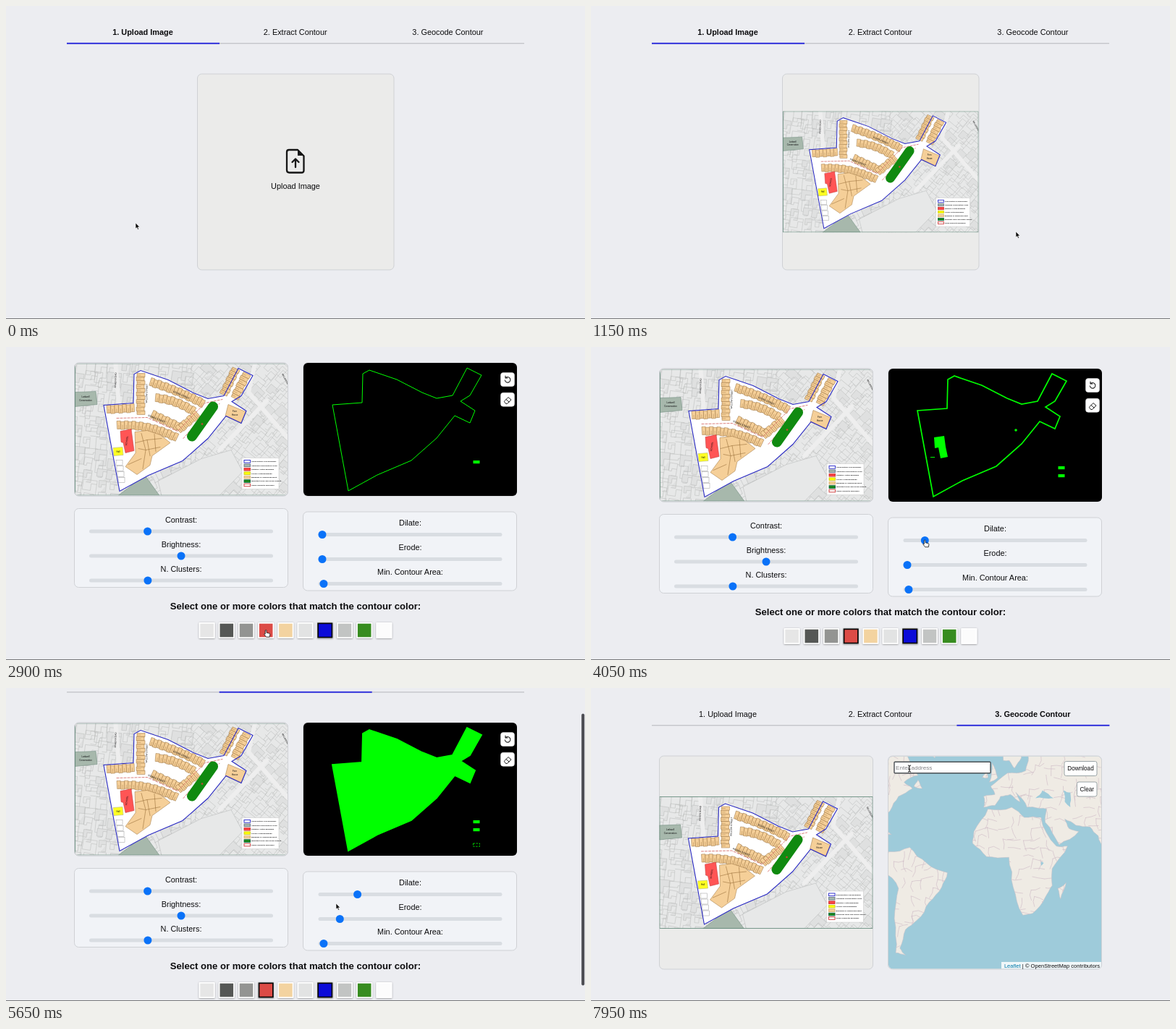
Recreate the animation shown at these times as an HTML page. Size 800 by 433 pixels, loop 8000 ms.

```html
<!DOCTYPE html>
<html lang="en">
<head>
<meta charset="utf-8">
<title>Contour extraction demo</title>
<style>
  html, body { margin: 0; height: 100%; overflow: hidden; background: #ecedf1; }
  #stage { display: block; width: 100vw; height: 100vh; }
  text { font-family: "Liberation Sans", Arial, sans-serif; fill: #0c0c0e; white-space: pre; }
  .ui text { font-family: Inter, sans-serif; fill: #333; }
  .ui .dim, .dim { fill: #808084 !important; }
  .line { fill: none; stroke-linecap: round; stroke-linejoin: round; }
  .hide { display: none; }
</style>
</head>
<body>
<svg id="stage" viewBox="0 0 800 433"></svg>
<script>
const LOOP = 8000, BLUE = '#0a72f8', LIME = '#0f0';
const MID = 'text-anchor="middle"', BOLD = 'font-weight="bold"';

// ---------- drawing helpers ----------
const text = (x, y, str, size = 10.9, attrs = MID) =>
  `<text x="${x}" y="${y + size * .36}" font-size="${size}" ${attrs}>${str}</text>`;
const rect = (x, y, w, h, fill, attrs = '') =>
  `<rect x="${x}" y="${y}" width="${w}" height="${h}" fill="${fill}" ${attrs}/>`;
const circle = (x, y, r, fill, attrs = '') => `<circle cx="${x}" cy="${y}" r="${r}" fill="${fill}" ${attrs}/>`;
const poly = (points, fill, attrs = '') => `<polygon points="${points}" fill="${fill}" ${attrs}/>`;
const path = (d, stroke, width = 1, attrs = '') =>
  `<path class="line" d="${d}" stroke="${stroke}" stroke-width="${width}" ${attrs}/>`;
const group = (id, body, attrs = '') => `<g id="${id}" ${attrs}>${body}</g>`;
const clip = (id, body) => `<clipPath id="${id}">${body}</clipPath>`;
const outline = (color, width = .5) => `stroke="${color}" stroke-width="${width}"`;
const times = (n, fn) => Array.from({ length: n }, (_, i) => fn(i)).join('');

function seeded(seed) {
  return () => (seed = (seed * 16807) % 2147483647) / 2147483647;
}

// ---------- town plan, 295 x 183 ----------
const BOUNDARY = '81,55 82,15 91,10 129,23 164,41 184,49 206,45 226,7 246,17 230,45 217,53 237,66 ' +
  '230,83 209,73 184,104 149,135 102,155 62,177 40,58';
const TAN = '#f5cf98', BROWN = '#9a713c', SAGE = '#a7b8ac';

// A row of houses along a gently bent street.
function terrace(x, y, x2, y2, bend = 0, depth = 11) {
  const dx = x2 - x, dy = y2 - y, length = Math.hypot(dx, dy), n = Math.round(length / 5.2), w = length / n;
  return times(n, i => {
    const u = i / n, lift = bend * 4 * u * (1 - u);
    const angle = Math.atan2(dy, dx) + Math.atan(bend * 4 * (1 - 2 * u) / length);
    const px = x + dx * u - dy / length * lift, py = y + dy * u + dx / length * lift;
    return `<g transform="translate(${px} ${py}) rotate(${angle * 180 / Math.PI})">` +
      rect(0, i % 2, w, depth, TAN, outline(BROWN)) + path(`M${w / 2} ${depth * .55}V${depth}`, BROWN, .4) + '</g>';
  });
}

function surroundings() {
  const rnd = seeded(77);
  let out = '';
  for (let y = -6; y < 190; y += 15) for (let x = -6; x < 300; x += 17) {
    const tilt = x > 150 ? 38 : x > 70 && y > 130 ? -28 : 4;
    const w = 9 + rnd() * 11, h = 8 + rnd() * 10, a = w * (.3 + rnd() * .4), b = h * (.3 + rnd() * .4);
    out += `<path transform="translate(${x + rnd() * 6} ${y + rnd() * 6}) rotate(${tilt + rnd() * 6})" ` +
      `d="M0 0H${w}V${b}H${a}V${h}H0ZM${w} ${b}V${h + 6}H${a}" fill="${rnd() < .3 ? '#dfe0e0' : 'none'}" ${outline('#b3b5b4', .45)}/>`;
  }
  return out;
}

function legend() {
  const rows = [['#fff', '#2323c8', 'Conservation Area Boundary'], [SAGE, '#667788', 'Adjoining Conservation Areas'],
    ['#f44', '#c33', 'Statutory Listed Buildings'], ['#ff0', '#cc2', 'Locally Listed Buildings'],
    [TAN, '#d9b070', 'Buildings of Townscape Merit'], ['#1c8a1a', '#164', 'Important Trees and Green Spaces'],
    ['#fff', '#c33', 'Urban Character Boundary']];
  return rect(231, 131, 51, 43, '#fff', outline('#bbb', .4)) + rows.map(([fill, stroke, label], i) => {
    const y = 134 + i * 5.45;
    return rect(234, y, 8.5, 3.6, fill, outline(stroke, .9)) + text(244, y + 1.8, label, 2.5, BOLD);
  }).join('');
}

const label = (x, y, str, turn) =>
  `<text font-size="3.2" transform="translate(${x} ${y}) rotate(${turn})">${str}</text>`;

const plan = rect(0, 0, 295, 183, '#e7e8e8') + surroundings() +
  path('M56 -4L61 58M250 -4L240 40 300 110M265 52L200 120', '#eee', 6) +
  poly('115,163 175,132 216,120 232,150 200,183 120,183', '#e7e8e8', outline('#b3b5b4')) +
  poly('0,40 29,39 31,57 0,60', SAGE, outline('#668576')) +
  poly('60,183 97,155 117,183', SAGE, outline('#668576')) +
  text(15, 46, 'Larkwell', 3) + text(15, 51, 'Conservation', 3) +
  poly(BOUNDARY, '#fff') +
  terrace(97, 14, 97, 71) + terrace(106, 20, 181, 51, -2) + terrace(44, 58, 82, 56) +
  terrace(112, 42, 168, 62, -4) + terrace(109, 65, 150, 84) + terrace(139, 88, 166, 65) +
  terrace(58, 80, 144, 98, -6) + terrace(228, 10, 211, 46) + terrace(243, 17, 226, 51) +
  poly('83,95 100,93 118,99 132,110 107,128 104,141 86,154 70,143 84,124', TAN, outline(BROWN)) +
  path('M84 110L100 106 104 128M92 97L98 120 118 116M74 140L92 132M100 106L120 104M88 118L98 120 94 146M110 98L112 122', BROWN, .6) +
  poly('212,57 236,67 230,82 208,73', TAN, outline(BROWN)) + text(221, 66, 'Fern', 3) + text(221, 71, 'House', 3) +
  poly('63,94 78,91 82,121 70,124 67,110 64,109', '#f55', outline('#b33')) +
  poly('53,117 66,116 67,127 54,128', '#ff2', outline('#aa8')) + text(60, 122, 'Hall', 3) +
  times(4, i => rect(57 + i, 134 + i * 8, 9, 7, '#fff', outline('#999'))) +
  path('M58 76L100 75 142 94 180 55 204 50M150 104L186 62 200 56', '#d2605e', .8, 'stroke-dasharray="3 2"') +
  path('M162 101L191 60', '#108a10', 14) + circle(176, 84, 1.3, '#c43') +
  label(100, 55, 'WILLOW STREET', -88) + label(136, 40, 'ELDER STREET', 24) + label(101, 73, 'ROWAN STREET', 22) +
  label(57, 34, 'ASHEN ROAD', -88) + label(286, 15, 'MILLBROW ROAD', 62) + label(72, 114, 'SCHOOL', -82) +
  poly(BOUNDARY, 'none', outline('#2a2ac4', 1.1)) + legend() +
  rect(.4, .4, 294.2, 182.2, 'none', outline('#5d8676', .8));

// ---------- world map (Mercator) ----------
const DEG = Math.PI / 180, SCALE = 1.93;
const project = ([lon, lat]) =>
  [560 + SCALE * lon, 242 - SCALE / DEG * Math.log(Math.tan(Math.PI / 4 + lat * DEG / 2))];

// Key points of a coast, roughened by midpoint displacement.
function coast(str) {
  const rnd = seeded(str.length * 31);
  let pts = str.split(' ').map(p => project(p.split(',').map(Number)));
  for (let pass = 0; pass < 2; pass++) {
    pts = pts.flatMap((a, i) => {
      const b = pts[(i + 1) % pts.length], k = (rnd() - .5) * .16;
      return [a, [(a[0] + b[0]) / 2 + (b[1] - a[1]) * k, (a[1] + b[1]) / 2 - (b[0] - a[0]) * k]];
    });
  }
  return pts.map(p => p.map(v => v.toFixed(1))).join(' ');
}
const AFRICA = '-6,36 11,37 20,31 32,31 43,12 51,12 40,-4 40,-16 35,-24 26,-34 19,-35 12,-17 9,4 -7,4.5 -17,14 -16,22';
const AMERICA = '-77,8 -62,11 -50,0 -35,-7 -39,-17 -48,-27 -57,-38 -65,-43 -69,-52 -65,-55 -72,-54 -73,-37 -70,-18 -81,-5';
const EURASIA = '-9,37 -9,43 -1,44 -4,48 8,54 21,55 23,60 20,66 84,66 84,18 80,9 77,9 73,19 67,25 57,26 49,30 52,24 59,22 ' +
  '45,13 35,28 36,36 27,37 22,37 14,45 17,40 10,44 3,43 -1,38';
const ISLANDS = ['44,-18 50,-14 46,-25', '-5,50 1,52 -3,58', '-10,52 -6,52 -7,55', '-59,48 -53,47 -56,51', '-84,22 -75,20 -78,22',
  '-50,63 -44,60 -40,64', '-84,31 -76,35 -70,43 -60,47 -66,50 -56,53 -64,61 -78,62 -78,53', '5,59 9,59 13,56 18,60 17,66 5,66'];
const LANDS = [AFRICA, AMERICA, EURASIA, ...ISLANDS].map(coast);
const LAKES = ['28,42 33,46 41,42 34,42', '48,46 53,45 53,37 49,40', '32,-2 34,0 32,1'].map(coast);

function borders() {
  const rnd = seeded(19), wob = () => (rnd() - .5) * 9;
  let d = '';
  for (let x = 415; x < 706; x += 15) for (let y = 96; y < 380; y += 14) {
    const from = `M${x + wob()} ${y + wob()}l`;
    if (rnd() < .6) d += `${from}${6 + wob() / 2} ${wob() / 2} ${8 + wob() / 2} ${wob()}`;
    if (rnd() < .6) d += `${from}${wob() / 2} 7 ${wob()} 7`;
  }
  return path(d, '#cdb9c4', .6);
}
const world = rect(411, 94, 295, 295, '#9ecbda') + LANDS.map(p => poly(p, '#efebe4', outline('#c3bcc4'))).join('') +
  `<g clip-path="url(#land)">${borders()}</g>` + LAKES.map(p => poly(p, '#9ecbda')).join('');

// ---------- page ----------
const FRAME = 'rx="6" stroke="#cfd1d5"';
const panel = (col, y, h, fill, w = 295) => rect(94.5 + 316 * col, y, w, h, fill, FRAME);
const stepper = rect(84, 51, 632, 1.4, '#c4c5ca') + rect(84, 50.8, 211, 1.8, '#2020dc', 'id="bar"') +
  ['1. Upload Image', '2. Extract Contour', '3. Geocode Contour']
    .map((s, i) => text(189 + i * 210.7, 36, s, 10.9, MID + ' class="step"')).join('');

const step1 = rect(264.5, 94, 271.5, 271, '#ebebea', `id="card" ${FRAME}`) +
  group('prompt', path('M391 199h12l8.5 8.5v20q0 3-3 3h-17q-3.5 0-3.5-3.5v-25q0-3 3-3zM400 223v-11M395.5 216l4.5-4.5 4.5 4.5', '#151515', 2.3) +
    poly('403,198 412,207 403,207', '#151515') + text(400, 249, 'Upload Image')) +
  group('preview', '<use href="#plan" transform="translate(265 145.5) scale(.917)"/>');

const SLIDERS = [['contrast', 'Contrast:', .309], ['bright', 'Brightness:', .5], ['clusters', 'N. Clusters:', 4 / 29],
  ['dilate', 'Dilate:', 0], ['erode', 'Erode:', 0], ['area', 'Min. Contour Area:', .008]];
function knob(id, value, scroll = 0) {
  const i = SLIDERS.findIndex(s => s[0] === id), col = Math.floor(i / 3);
  return [120.5 + 316.5 * col + 243 * value, 327 + 34 * (i % 3) + 4.5 * col - scroll];
}
const sliders = SLIDERS.map(([id, name, value]) => {
  const [x, y] = knob(id, 0);
  return text(x + 121.5, y - 16, name) + rect(x - 5.5, y - 2.5, 254, 5, '#d9dde2', 'rx="2.5"') +
    circle(knob(id, value)[0], y, 5.5, BLUE, `id="${id}"`);
}).join('');

const COLORS5 = ['#ebebeb', '#45564f', '#e2cfa6', '#979797', '#d3504b'];
const COLORS10 = ['#e6e6e6', '#555755', '#939492', '#dc4b46', '#f3d3a0', '#e2e3e3', '#0b0bd8', '#c2c4c3', '#378c1f', '#fcfcfc'];
const RED = 3, NAVY = 6;
const swatch = (i, n, scroll = 0) => [400 + (i - (n - 1) / 2) * 27.2, 464 - scroll];
const swatches = list => list.map((color, i) => {
  const [x, y] = swatch(i, list.length);
  return rect(x - 11, y - 11, 22, 22, '#fff', 'rx="1" filter="url(#soft)"') + rect(x - 9.3, y - 9.3, 18.6, 18.6, color) +
    rect(x - 9.7, y - 9.7, 19.4, 19.4, 'none', `class="ring hide" ${outline('#050505', 1.8)}`);
}).join('');

const bit = i => rect(234.5, 135 + i * 11 + (i > 1 ? 10 : 0), 9, 4.2, i > 1 ? 'none' : LIME,
  'class="bit"' + (i > 1 ? ` ${outline(LIME, .8)} stroke-dasharray="2.5 1.5"` : ''));
const contour = rect(411, 94, 295, 184, '#000') + '<g transform="translate(411 94)">' +
  poly(BOUNDARY, 'none', `id="shape" stroke="${LIME}"`) +
  group('reds', poly('63,95 77,93 79,108 82,122 72,124 69,109 64,110', LIME) + rect(58, 122, 6, 1, LIME) + circle(176, 85, 1.8, LIME)) +
  times(3, bit) + '</g>';
const tool = (id, y, icon) => rect(683.5, y - 9.5, 19, 19, '#fff', `id="${id}" rx="3.5" ${outline('#d8d8da', .6)}`) + icon;

const step2 = panel(0, 94, 184, '#ebebea') + '<g clip-path="url(#left)"><use href="#plan" x="95" y="94.5"/></g>' + panel(0, 94, 184, 'none') +
  panel(1, 94, 184, '#edeef1') + group('contour', contour, 'clip-path="url(#right)"') +
  tool('undo', 117, path('M690.5 114.5a3.8 3.8 0 1 1-1.2 3.3M690 112v3h3', '#222', 1.1)) +
  tool('erase', 144.7, path('M688.5 147l5.5-5.5 4 3.5-5.5 5.5h-1.5zM691 144.5l4 3.5', '#222', 1, 'id="rubber"')) +
  panel(0, 295.5, 109, '#f1f3f7') + panel(1, 300, 109, '#f1f3f7') + sliders +
  text(400, 430.5, 'Select one or more colors that match the contour color:', 13.1, `${MID} ${BOLD}`) +
  group('few', swatches(COLORS5)) + group('many', swatches(COLORS10));

const white = (x, y, w, label) => rect(x, y, w, 20, '#fff', `rx="2.5" ${outline('#8f9a9e', .9)}`) + text(x + w / 2, y + 10, label, 8.2);
const step3 = panel(0, 94, 295, '#ebebea') + '<use href="#plan" x="94.5" y="150"/>' +
  `<g clip-path="url(#globe)">${world}${rect(567, 379, 139, 10, '#fff', 'opacity=".85"')}</g>` + panel(1, 94, 295, 'none') +
  text(703, 384, '<tspan fill="#0078a8">Leaflet</tspan> | © OpenStreetMap contributors', 7.6, 'text-anchor="end"') +
  rect(419, 102.3, 133, 15.5, '#fff', `rx="1" ${outline('#4b5054', 1.4)}`) +
  text(421, 110.5, 'Enter address', 8.1, 'class="dim"') + white(654, 101.5, 45, 'Download') + white(671.5, 130, 27.5, 'Clear');

// ---------- file dialog ----------
const INDIGO = '#5a68cf', TEAL = '#58a3b0', GREY = '#777';
const ring = (color, inner) => circle(0, 0, 3.8, 'none', outline(color, .9)) + path(inner, color, .7);
const tag = color => circle(0, 0, 2.5, color, outline(color === 'none' ? GREY : color, .9));
const SIDEBAR = [
  ['Favourites', [
    ['Recents', ring(INDIGO, 'M0-2v2.300h1.800')], ['Applicati…', path('M-3.5 3.5L0-3.5 3.5 3.5M-4 1.5h8', INDIGO, .9)],
    ['Desktop', path('M-4-3.5h8v6h-8zM-4-1.500h8', INDIGO, .9)], ['Parcelo', rect(-3.5, -3.5, 7, 7, INDIGO)],
    ['Downloads', ring(INDIGO, 'M0-2v4M-1.600.5L0 2 1.600.5')]]],
  ['Nimvra', [['Nimvra Dri…', circle(0, 0, 3.6, TEAL)], ['Shared', path('M-4-3h3l1 1h4v5.500h-8zM-4-.5h8', TEAL, .9)]]],
  ['Locations', [['Network', ring(GREY, 'M-3.800 0h7.600M0-3.800v7.600M-2.500-2.500l5 5M2.500-2.500l-5 5')]]],
  ['Tags', [['.py', tag('none')], ['Importante', tag('none')], ['Gris', tag('#858588')], ['Roja', tag('#d94b4b')],
    ['Naranja', tag('#c2553f')], ['Amarilla', tag('#ab7544')]]]
];
function sidebar() {
  let y = 57, out = '';
  for (const [head, items] of SIDEBAR) {
    out += text(191, y, head, 5.8, 'class="dim" font-weight="600"');
    y += 12.2;
    for (const [name, icon] of items) {
      out += `<g transform="translate(196.5 ${y})">${icon}</g>` + text(204, y, name, 6.7, '');
      y += 15.2;
    }
    y += 5.3;
  }
  return out;
}
const box = (x, y, w, label = '') => rect(x, y, w, 11.5, '#f7f7f7', `rx="2.5" ${outline('#9b9b9b', .8)}`) + text(x + w / 2, y + 5.7, label, 6.6);
const grid = (n, x) => times(n * 2, i => rect(x + (i % n) * (7 / n), 70.5 + Math.floor(i / n) * 3.5, 5 / n, 2.5, '#444'));
const file = (x, name, size) => text(x, 146.8, name, 6.5) + text(x, 154.8, size, 5.1, MID + ' class="dim"');
const dialog = rect(182.5, 43.5, 435, 286, '#f2f2f2', `rx="7" fill-opacity=".92" ${outline('#77787a', 1)}`) +
  '<path d="M252 44H189q-6 0-6 6V323q0 6 6 6h63z" fill="#e4e4e6" opacity=".75"/>' +
  path('M252.3 44V329', '#a3a3a5', .8) + path('M253 91H617M253 296.5H617', '#bcbcbe', .8) + sidebar() +
  text(435, 53, 'Choose Files to Upload', 5.9, MID + ' font-weight="500"') +
  box(263, 67.5, 27) + path('M276.5 67.5v11.5', '#aaa', .7) + path('M270.5 71l-2 2.3 2 2.3M282.5 71l2 2.3-2 2.3', GREY) +
  box(293, 67.5, 26) + grid(2, 299) + box(322.5, 67.5, 25.5) + grid(3, 329) +
  path('M311 72.5l1.7 1.7 1.7-1.7M340 72.5l1.7 1.7 1.7-1.7', '#333') +
  box(378.5, 67.5, 113) + rect(384, 70, 7.5, 6.5, '#46a5e6', 'rx="1"') + text(394, 73.3, 'images', 6.7, '') +
  path('M484.5 72l1.6-1.7 1.6 1.7M484.5 74.5l1.6 1.7 1.6-1.7', '#333', .9) +
  box(523.5, 67.5, 82.5) + circle(530, 72.7, 2.3, 'none', outline('#555', 1)) + path('M531.7 74.5l2 2', '#555') +
  text(538, 73.3, 'Search', 6.7, 'class="dim"') +
  group('picked', rect(264.5, 101.5, 39.5, 39, '#929294', 'rx="3"') + rect(264, 142.5, 40.5, 8.5, '#cfcfd1', 'rx="2"')) +
  '<use href="#plan" transform="translate(269 111) scale(.106 .118)"/>' + rect(268.5, 110.5, 32, 22.5, 'none', outline('#fff', 1)) +
  rect(330, 112, 31, 19.5, '#ccd7d6', outline('#fff', .8)) + poly('338,116 347,114 355,126 344,129 337,124', '#e9b7b3') +
  file(284, 'test_image1', '1,502×936') + file(345, 'test_image2.png', '1,024×576') +
  box(523.5, 307.5, 40, 'Cancel') + box(567, 307.5, 40, 'Upload');

const CURSORS = {
  arrow: '<path d="M0 0v8l1.8-1.6 1.3 2.9 1.4-.6-1.3-2.8h2.5z" fill="#0a0a0a" stroke="#fff" stroke-width=".6"/>',
  hand: '<path d="M-1 0q1-1 1.8 0v3.2l4 1q1 .4 .8 1.6l-.6 3.4h-4.600l-3-3.800q.1-1.200 1.600-.2z" fill="#fff" stroke="#111" stroke-width=".8"/>',
  cross: path('M-4 0H4M0-4V4', '#fff', 2) + path('M-4 0H4M0-4V4', '#333', .9),
  beam: path('M-1.7-4.5q1.7 0 1.7 1v7q0 1-1.7 1M1.7-4.5q-1.7 0-1.7 1M1.7 4.5q-1.7 0-1.7-1M-1 .8h2', '#111')
};

document.getElementById('stage').innerHTML = '<defs>' + clip('frame', rect(0, 0, 295, 183, '#000')) +
  clip('left', rect(95, 94.5, 294, 183, '#000', 'rx="6"')) + clip('right', rect(411, 94, 295, 184, '#000', 'rx="6"')) +
  clip('globe', rect(411, 94.5, 294.5, 294, '#000', 'rx="6"')) + clip('land', LANDS.map(p => poly(p, '#000')).join('')) +
  '<filter id="soft" x="-30%" y="-30%" width="160%" height="160%"><feDropShadow dx="0" dy=".6" stdDeviation="1" flood-opacity=".4"/></filter>' +
  '<filter id="deep" x="-10%" y="-10%" width="120%" height="125%"><feDropShadow dx="0" dy="4" stdDeviation="6" flood-opacity=".25"/></filter>' +
  group('plan', plan, 'clip-path="url(#frame)"') + '</defs>' + rect(0, 0, 800, 433, '#ecedf1') +
  group('page', stepper + group('step1', step1) + group('step2', step2) + group('step3', step3)) +
  rect(795.2, 0, 4, 376, '#4b4c51', 'id="thumb" rx="2"') +
  group('modal', rect(0, 0, 800, 433, '#000', 'opacity=".215"') + `<g class="ui" filter="url(#deep)">${dialog}</g>`) +
  rect(0, 432, 800, 1, '#77787b') +
  group('cursor', Object.entries(CURSORS).map(([kind, body]) => group(kind, body)).join(''));

// ---------- timeline ----------
const OPEN = 350, CLOSE = 1150, STEP2 = 1300, STEP3 = 7450, ERASE = 6550;
const SCROLLS = [[STEP2, 1600, 72], [3200, 3400, -8], [5430, 5640, -18], [7250, 7350, 26], [STEP3, 7650, -72]];

// Places the pointer rests at: arrival, departure, point, cursor.
const VISITS = [
  [0, 50, [179, 300], 'arrow'], [300, 400, [398, 225], 'hand'], [800, 950, [296, 136], 'arrow'],
  [1100, 1200, [587, 312], 'arrow'], [1600, 1750, [333, 256], 'arrow'],
  [1950, 1950, knob('clusters', 4 / 29, 72), 'hand'], [2250, 2250, knob('clusters', 9 / 29, 72), 'hand'],
  [2450, 2600, swatch(NAVY, 10, 72), 'hand'], [2900, 3400, swatch(RED, 10, 72), 'hand'],
  [3800, 3950, knob('dilate', 0, 64), 'hand'], [4050, 4300, knob('dilate', .1, 64), 'hand'],
  [4500, 4550, knob('dilate', .2, 64), 'hand'], [4750, 4900, knob('erode', 0, 64), 'hand'],
  [5050, 5050, knob('erode', .1, 64), 'hand'], [5130, 6000, [456, 298], 'arrow'],
  [6130, 6130, knob('erode', .1, 46), 'hand'], [6300, 6300, knob('erode', .2, 46), 'hand'],
  [6520, 6580, [693, 98], 'hand'], [6680, 6680, [650, 180], 'cross'], [6780, 6780, [650, 217], 'cross'],
  [6850, 6900, [662, 233], 'cross'], [7100, 7350, [640, 420], 'hand'], [7800, LOOP, [440, 111.5], 'beam']
];

const ramp = (t, a, b) => Math.min(1, Math.max(0, (t - a) / (b - a)));
const smooth = (t, a, b) => { const u = ramp(t, a, b); return u * u * (3 - 2 * u); };
const notches = (t, a, b, n = 1) => Math.round(n * ramp(t, a, b));

function pointer(t) {
  const i = VISITS.findIndex(v => v[1] >= t), to = VISITS[i], from = VISITS[i - 1] || to;
  const u = t < to[0] ? smooth(t, from[1], to[0]) : 1;
  const near = t > to[0] - 40 || from[3] === to[3] ? to[3] : t < from[1] + 40 ? from[3] : 'arrow';
  return [...to[2].map((v, n) => from[2][n] + (v - from[2][n]) * u), near];
}

const $ = id => document.getElementById(id);
const all = selector => [...document.querySelectorAll(selector)];
const show = (el, on) => el.classList.toggle('hide', !on);
const set = (id, name, value) => $(id).setAttribute(name, value);
const labels = all('.step'), bits = all('.bit'), rings = all('#many .ring');

function draw(t) {
  const scroll = SCROLLS.reduce((sum, [a, b, by]) => sum + by * smooth(t, a, b), 0);
  const step = t < STEP2 ? 1 : t < STEP3 ? 2 : 3;
  const clusters = 5 + notches(t, 1950, 2250, 5);
  const dilate = notches(t, 3950, 4050) + notches(t, 4300, 4500);
  const erode = notches(t, 4900, 5050) + notches(t, 6130, 6300);

  set('page', 'transform', `translate(0 ${-scroll})`);
  set('bar', 'x', 84 + (step - 1) * 210.7);
  labels.forEach((el, i) => el.setAttribute('font-weight', i + 1 === step ? 'bold' : 'normal'));
  [1, 2, 3].forEach(n => show($('step' + n), n === step));
  set('thumb', 'y', scroll * .77);
  show($('thumb'), SCROLLS.some(([a, b]) => t > a && t < b + 100));

  set('card', 'fill', t >= 250 && t < CLOSE ? '#d2d2d2' : '#ebebea');
  show($('prompt'), t < CLOSE);
  show($('preview'), t >= CLOSE);
  show($('modal'), t >= OPEN && t < CLOSE);
  set('modal', 'opacity', ramp(t, OPEN - 50, OPEN + 100));
  show($('picked'), t >= 800);

  set('clusters', 'cx', knob('clusters', (clusters - 1) / 29)[0]);
  set('dilate', 'cx', knob('dilate', dilate / 10)[0]);
  set('erode', 'cx', knob('erode', erode / 10)[0]);
  show($('few'), clusters < 10);
  show($('many'), clusters === 10);
  const blue = t >= 2500, red = t >= 2950;
  show(rings[NAVY], blue);
  show(rings[RED], red);

  show($('contour'), blue);
  show($('reds'), red);
  set('shape', 'fill', dilate > 1 ? LIME : 'none');
  set('shape', 'stroke-width', 1 + dilate * .7 - erode * .5);
  const needed = [blue, red, dilate > 1];
  bits.forEach((el, i) => show(el, needed[i] && t < ERASE + 150 + i * 40));
  set('erase', 'fill', t >= ERASE ? BLUE : '#fff');
  set('rubber', 'stroke', t >= ERASE ? '#fff' : '#222');

  const [x, y, kind] = pointer(t);
  set('cursor', 'transform', `translate(${x} ${y})`);
  Object.keys(CURSORS).forEach(k => show($(k), k === kind));
}

const start = performance.now();
function tick() {
  draw((performance.now() - start) % LOOP);
  requestAnimationFrame(tick);
}
tick();
</script>
</body>
</html>
```
